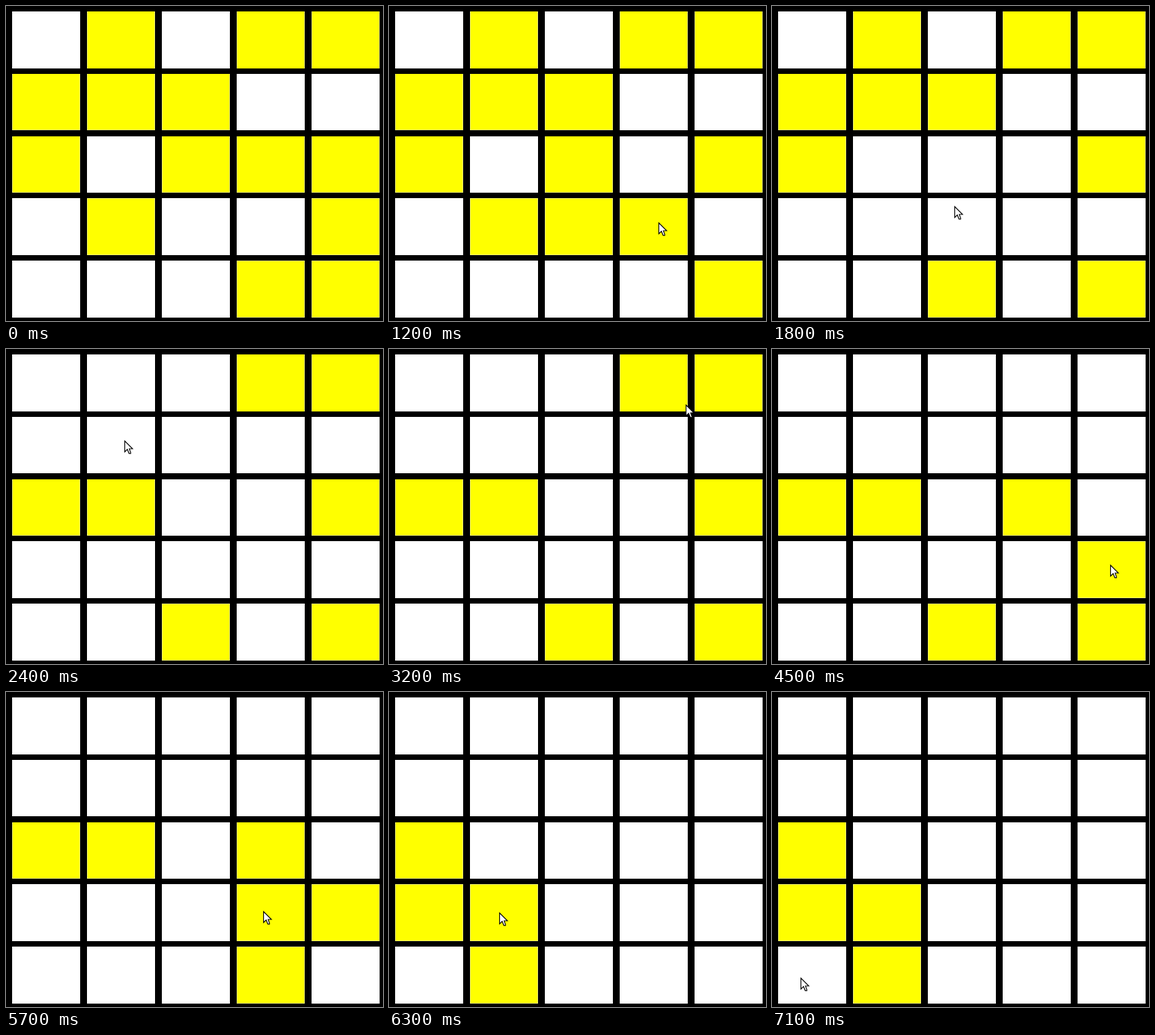
An HTML page with a canvas for the animation above (7.2 s loop, 554x464 px).

```html
<!DOCTYPE html>
<html lang="en">
<head>
<meta charset="utf-8">
<title>Lights puzzle</title>
<style>
  html, body { margin: 0; width: 100%; height: 100%; overflow: hidden; background: #000; }
  canvas { display: block; }
</style>
</head>
<body>
<canvas id="board" width="554" height="464"></canvas>
<script>
const ctx = document.getElementById('board').getContext('2d');
const LOOP = 7200, STEP = 100, SIZE = 5;
const LEFT = 9, TOP = 8, COL = 110, ROW = 91.75, CELL_W = 100, CELL_H = 83.4;
const ARRIVE = 100, LEAVE = 200; // rest before and after each press
const START = ['01011', '11100', '10111', '01001', '00011'];

// Pointer stops; each presses the cell beneath it unless it only hovers
const STOPS = [
  { at: 300, x: 560, y: 470, hover: true },
  { at: 1000, x: 396, y: 319 },
  { at: 1500, x: 285, y: 325 },
  { at: 2200, x: 174, y: 135 },
  { at: 3600, x: 494, y: 70 },
  { at: 4100, x: 496, y: 235 },
  { at: 4600, x: 497, y: 318, hover: true },
  { at: 5200, x: 388, y: 412 },
  { at: 5800, x: 378, y: 323 },
  { at: 6300, x: 162, y: 325 },
  { at: 7200, x: 42, y: 421, hover: true }
];
const PRESSES = STOPS.filter(stop => !stop.hover).map(({ at, x, y }) => ({
  at, row: Math.floor((y - TOP) / ROW), col: Math.floor((x - LEFT) / COL)
}));
const ARROW = new Path2D('M.5 .5V16.5L4.3 12.9L6.8 18.8H9.2V17.5L7.2 12H12Z');

const even = n => n - n % 2;
const smooth = k => k * k * (3 - 2 * k);

// A press flips a cell and its orthogonal neighbours
function isLit(row, col, time) {
  const flips = PRESSES.filter(p =>
    p.at <= time && Math.abs(p.row - row) + Math.abs(p.col - col) <= 1).length;
  return (Number(START[row][col]) + flips) % 2 === 1;
}

function pointerAt(time) {
  const i = STOPS.findIndex(stop => stop.at - ARRIVE >= time);
  if (i < 1) return null;
  const from = STOPS[i - 1], to = STOPS[i];
  const leave = from.at + LEAVE, arrive = to.at - ARRIVE;
  const k = smooth(Math.max(0, (time - leave) / (arrive - leave)));
  return [from.x + (to.x - from.x) * k, from.y + (to.y - from.y) * k].map(Math.round);
}

function fillBox(color, x0, y0, x1, y1) {
  ctx.fillStyle = color;
  ctx.fillRect(x0, y0, x1 - x0, y1 - y0);
}

function drawCell(row, col, lit) {
  const x0 = LEFT + COL * col, x1 = x0 + CELL_W;
  const y0 = Math.round(TOP + ROW * row), y1 = Math.round(TOP + ROW * row + CELL_H + 0.1);
  fillBox(lit ? '#f0f171' : '#fff', x0, y0, x1, y1);
  // The full yellow covers whole pixel pairs, leaving a pale rim on odd edges
  if (lit) fillBox('#ff0', even(x0 + 1), even(y0 + 1), even(x1), even(y1));
}

function drawPointer(x, y) {
  ctx.save();
  ctx.translate(x, y);
  ctx.fillStyle = '#fff';
  ctx.strokeStyle = '#000';
  ctx.lineWidth = 1.2;
  ctx.fill(ARROW);
  ctx.stroke(ARROW);
  ctx.restore();
}

function draw(time) {
  fillBox('#000', 0, 0, 554, 464);
  for (let row = 0; row < SIZE; row++) {
    for (let col = 0; col < SIZE; col++) drawCell(row, col, isLit(row, col, time));
  }
  const pointer = pointerAt(time);
  if (pointer) drawPointer(...pointer);
}

let origin;
function tick(now) {
  origin ??= now;
  draw(Math.floor(((now - origin) % LOOP) / STEP) * STEP);
  requestAnimationFrame(tick);
}
draw(0);
requestAnimationFrame(tick);
</script>
</body>
</html>
```
